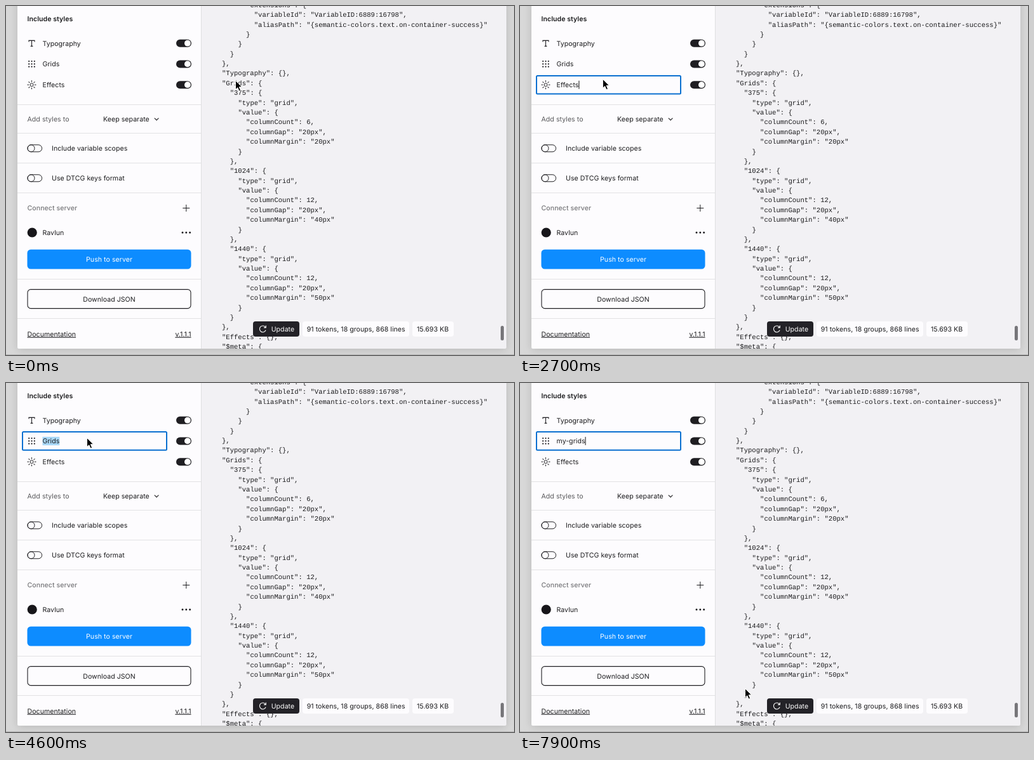
Recreate the animation shown at these times as an HTML page. Size 800x550 px, loop 8000 ms.

```html
<!DOCTYPE html>
<html lang="en">
<head>
<meta charset="utf-8">
<title>Style settings</title>
<style>
html, body { margin: 0; width: 100%; height: 100%; overflow: hidden; background: #d6d6d6; }
svg { display: block; }
text { font: 400 10.57px Inter, sans-serif; letter-spacing: .05px; fill: #1b1b1d; text-rendering: geometricPrecision; }
.bold { font-weight: 600; }
.mid { font-weight: 500; fill: #77777a; }
.soft { fill: #58585b; }
.white { fill: #fff; }
.link { text-decoration: underline; }
.code { font-family: "Liberation Mono", "Courier New", monospace; letter-spacing: 0; }
</style>
</head>
<body>
<svg id="stage" width="800" height="550" viewBox="0 0 800 550">
  <defs>
    <filter id="shadow" x="-10%" y="-10%" width="120%" height="120%">
      <feGaussianBlur stdDeviation="7"/>
    </filter>
    <clipPath id="win"><rect x="18" y="-10" width="770" height="550" rx="2"/></clipPath>
  </defs>
  <rect width="800" height="550" fill="#d8d8d8"/>
  <rect x="18" y="-10" width="770" height="552" fill="#8a8a8a" opacity=".4" filter="url(#shadow)"/>
  <rect y="549" width="800" height="1" fill="#b4b4b4"/>
  <g clip-path="url(#win)">
    <rect x="18" width="290" height="540" fill="#fdfcfe"/>
    <rect x="307" width="481" height="540" fill="#f2f1f4"/>
    <rect x="307" width="1" height="540" fill="#dfdfe1"/>
    <g id="panel"></g>
    <g id="code"></g>
    <g id="status"></g>
  </g>
  <g id="live"></g>
</svg>
<script>
const LOOP = 8000, STEP = 100;
const INK = '#1f1e22';
const $ = id => document.getElementById(id);

function add(parent, tag, attrs, content) {
  const el = document.createElementNS('http://www.w3.org/2000/svg', tag);
  for (const k in attrs) el.setAttribute(k, attrs[k]);
  if (content !== undefined) el.textContent = content;
  parent.appendChild(el);
  return el;
}

// Text is placed by the vertical centre of its capitals.
const label = (parent, x, mid, str, cls = '', anchor = 'start') =>
  add(parent, 'text', { x, y: mid + 3.8, class: cls, 'text-anchor': anchor }, str);
const box = (parent, x, y, width, height, rx, style = {}) =>
  add(parent, 'rect', { x, y, width, height, rx, ...style });
const dot = (parent, cx, cy, r, style = {}) =>
  add(parent, 'circle', { cx, cy, r, ...style });
const line = (parent, d, width = 1, stroke = INK) =>
  add(parent, 'path', { d, fill: 'none', stroke, 'stroke-width': width });

const ROWS = [58.7, 91.4, 124.2];
const NAMES = ['Typography', 'Grids', 'Effects'];
const panel = $('panel');

// Side panel
for (const y of [155, 200, 247, 294, 430, 492])
  box(panel, 18, y, 289, 1, 0, { fill: '#e2e2e4' });
label(panel, 33.5, 20.3, 'Include styles', 'bold');

for (const y of ROWS) {
  box(panel, 268, y - 6, 24, 12, 6, { fill: INK });
  dot(panel, 285.9, y, 4.9, { fill: '#fff' });
}
line(panel, 'M36 56.6V54.4H45V56.6M40.5 54.4V63.4M38.6 63.4H42.4', 1.1);
for (let i = 0; i < 9; i++)
  dot(panel, 36.2 + i % 3 * 4.3, 87.1 + Math.floor(i / 3) * 4.3, 1.1, { fill: INK });
dot(panel, 40.5, 124.2, 2.5, { fill: 'none', stroke: INK });
for (let i = 0; i < 8; i++)
  add(panel, 'path', { d: 'M40.5 119.8V117.2', stroke: INK, transform: `rotate(${i * 45} 40.5 124.2)` });

label(panel, 33.5, 178.2, 'Add styles to', 'soft');
label(panel, 153, 178.2, 'Keep separate');
line(panel, 'M233.8 176.6L237.1 179.9L240.4 176.6', 1.1);

[[224.3, 'Include variable scopes'], [271.3, 'Use DTCG keys format']].forEach(([y, str]) => {
  box(panel, 34, y - 5.5, 22.6, 11, 5.5, { fill: 'none', stroke: INK });
  dot(panel, 39.5, y, 5.5, { fill: 'none', stroke: INK });
  label(panel, 72, y, str);
});

label(panel, 33.5, 318.5, 'Connect server', 'mid');
line(panel, 'M278.3 318.5H289.3M283.8 313V324');
dot(panel, 41.2, 357, 7.6, { fill: '#17161a' });
label(panel, 57.5, 357, 'Ravlun');
for (const x of [278, 283.8, 289.6]) dot(panel, x, 357, 1.5, { fill: INK });

box(panel, 33.5, 383.7, 258, 30.8, 5.5, { fill: '#0d8cff' });
label(panel, 162.5, 399.3, 'Push to server', 'white', 'middle');
box(panel, 34, 446.6, 257, 30, 5, { fill: 'none', stroke: INK, 'stroke-width': 1.1 });
label(panel, 162.5, 461.8, 'Download JSON', '', 'middle');
label(panel, 33.5, 516.9, 'Documentation', 'link');
label(panel, 291.5, 516.9, 'v.1.1.1', 'link', 'end');

// Code panel
const grid = (name, cols, margin, end) => [
  [1, `"${name}": {`], [2, '"type": "grid",'], [2, '"value": {'],
  [3, `"columnCount": ${cols},`], [3, '"columnGap": "20px",'], [3, `"columnMargin": "${margin}px"`],
  [2, '}'], [1, end]
];
const CODE = [
  [3, '"extensions": {'],
  [4, '"variableId": "VariableID:6889:16798",'],
  [4, '"aliasPath": "{semantic-colors.text.on-container-success}"'],
  [3, '}'], [2, '}'], [1, '}'], [0, '},'],
  [0, '"Typography": {},'], [0, '"Grids": {'],
  ...grid(375, 6, 20, '},'), ...grid(1024, 12, 40, '},'), ...grid(1440, 12, 50, '}'),
  [0, '},'], [0, '"Effects": {},'], [0, '"$meta": {']
];
CODE.forEach(([indent, str], i) =>
  add($('code'), 'text', { x: 340 + indent * 12.69, y: 1.8 + i * 15.38, class: 'code' }, str));

// Status pills and scrollbar
const status = $('status');
box(status, 389, 497, 73, 24, 4, { fill: '#232227' });
line(status, 'M408.6 506.2A5 5 0 1 0 409.1 510.8M409.3 503.6V506.9H406', 1.1, '#fff');
label(status, 417.7, 509, 'Update', 'white');
box(status, 467, 497, 168, 24, 4, { fill: '#fdfcfe' });
label(status, 473.7, 509, '91 tokens, 18 groups, 868 lines');
box(status, 640, 497, 65, 24, 4, { fill: '#fdfcfe' });
label(status, 647, 509, '15.693 KB');
box(status, 779, 504, 5, 23, 2.5, { fill: '#77767a' });

// Moving parts
const live = $('live');
const select = box(live, 57.5, 84.8, 26, 13.4, 0, { fill: '#a8d8f8' });
const names = ROWS.map((y, i) => label(live, 57.5, y, NAMES[i]));
const hover = box(live, 26.5, 0, 226, 28, 1, { fill: 'none', stroke: '#dcdcde' });
const focus = box(live, 26, 0, 227, 28.6, 1.5, { fill: 'none', stroke: '#0b70d0', 'stroke-width': 2 });
const caret = box(live, 0, 0, 1, 13, 0, { fill: '#111' });
const ring = dot(live, 0, 0, 20.8, { fill: 'none', stroke: '#18181a', 'stroke-width': 1.6 });
const cursor = add(live, 'path', {
  d: 'M0 0V14.2L3.3 11.2L5.6 16.6L8.1 15.5L5.8 10.2H10.2Z',
  fill: '#000', stroke: '#fff', 'stroke-width': 1, 'stroke-linejoin': 'round'
});

// Pointer stops: time, x, y
const PATH = [
  [0, 361, 117], [200, 361, 117], [1200, 267, 98], [1600, 122, 89], [1800, 122, 90],
  [2100, 124, 119], [2600, 126, 121], [3100, 163, 60], [3500, 163, 60],
  [4100, 127, 86], [7600, 127, 86], [7900, 354, 481]
];
// Presses: time, row
const CLICKS = [[1650, 1], [2450, 2], [3150, 0], [4200, 1], [4400, 1]];
// Keystrokes for "my-grids"
const WORD = 'my-grids';
const KEYS = [5500, 5600, 5700, 6900, 7050, 7200, 7350, 7500];
const SELECT_AT = 4400, SHOW_AT = 7600;

function pointer(t) {
  const i = PATH.findIndex(p => p[0] > t);
  if (i < 0) return PATH[PATH.length - 1].slice(1);
  const [t0, x0, y0] = PATH[i - 1], [t1, x1, y1] = PATH[i];
  const k = (t - t0) / (t1 - t0), e = k * k * (3 - 2 * k);
  return [x0 + (x1 - x0) * e, y0 + (y1 - y0) * e];
}

const show = (el, on) => el.setAttribute('visibility', on ? 'visible' : 'hidden');
const set = (el, attrs) => { for (const k in attrs) el.setAttribute(k, attrs[k]); };

function draw(t) {
  const [x, y] = pointer(t);
  const typed = KEYS.filter(k => k <= t).length;
  const last = CLICKS.filter(c => c[0] <= t).pop();
  const row = last ? last[1] : -1;
  const seen = !typed || t >= SHOW_AT;
  const selected = t >= SELECT_AT && !typed;

  names[1].textContent = typed ? WORD.slice(0, typed) : NAMES[1];
  show(select, selected);
  if (selected) set(select, { width: names[1].getComputedTextLength() });

  show(focus, row >= 0);
  const since = t - (typed ? KEYS[typed - 1] : last ? last[0] : 0);
  show(caret, row >= 0 && !selected && since % 1000 < 500);
  if (row >= 0) {
    set(focus, { y: ROWS[row] - 14.3 });
    set(caret, { x: 57.5 + names[row].getComputedTextLength(), y: ROWS[row] - 6.5 });
  }

  const over = x > 26 && x < 253 ? ROWS.findIndex(r => Math.abs(y - r) < 14.5) : -1;
  show(hover, seen && over >= 0 && over !== row);
  if (over >= 0) set(hover, { y: ROWS[over] - 14 });

  show(ring, CLICKS.some(c => t >= c[0] - 50 && t < c[0] + 100));
  set(ring, { cx: x, cy: y + 1.5 });
  show(cursor, seen);
  set(cursor, { transform: `translate(${x + .5} ${y + .5})` });
}

function tick() {
  draw(Math.floor(performance.now() % LOOP / STEP) * STEP);
  requestAnimationFrame(tick);
}
tick();
</script>
</body>
</html>
```
